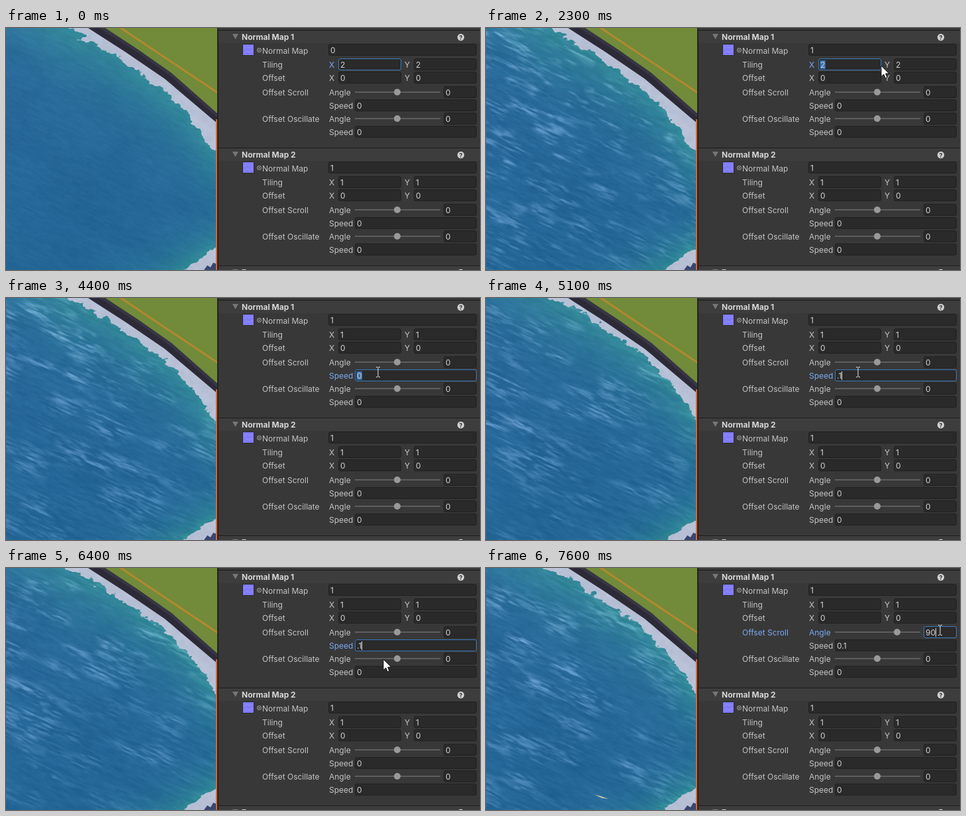
Animation, 716 px wide and 366 px high, one loop 8 s. Source, as an HTML page with a canvas:

```html
<!DOCTYPE html>
<html lang="en">
<head>
<meta charset="utf-8">
<title>Water normal map settings</title>
<style>
html, body { margin: 0; width: 100%; height: 100%; overflow: hidden; background: #383838; }
canvas, svg { position: absolute; left: 0; top: 0; display: block; }
text { font: 12px Inter, Roboto, sans-serif; fill: #c4c4c4; white-space: pre; }
.title { font-weight: 700; fill: #d6d6d6; }
.value { fill: #d2d2d2; }
.on { fill: #7ba9f2; }
.box { fill: #2a2a2a; stroke: #212121; }
.box.hover { stroke: #696969; }
.box.focus { stroke: #3a79bb; }
</style>
</head>
<body>
<canvas id="water" width="319" height="366"></canvas>
<svg id="ui" width="716" height="366" viewBox="0 0 716 366">
  <g id="land">
    <path d="M124 0L180 36L240 77L280 111L319 144V0Z" fill="#2d2a38"/>
    <path d="M141 0L200 38L250 74L319 135V129L250 68L150 0Z" fill="#383545"/>
    <path d="M150 0L200 33L250 68L319 129V0Z" fill="#718b3a"/>
    <path d="M172 -1L320 98" stroke="#b2882f" stroke-width="3"/>
    <path d="M299 366L304 359L309 362L313 355L319 357V366Z" fill="#39466f"/>
  </g>
  <path id="glint" d="M164 343L173 345L178 347L186 349L176 348Z" fill="#ecdca4"/>
  <rect x="319" width="397" height="366" fill="#383838"/>
  <rect x="319" width="2" height="366" fill="#222"/>
  <rect x="317" y="138" width="2" height="228" fill="#e2622c"/>
  <g id="panel"></g>
  <g id="ibeam" fill="none" stroke="#e8e8e8">
    <path d="M-3 -7.5H-1L0 -6.5L1 -7.5H3M0 -6.5V6.5M-3 7.5H-1L0 6.5L1 7.5H3"/>
  </g>
  <g id="arrow">
    <path id="slide" d="M-6 3L-2 0V6ZM10 3L6 0V6Z" fill="#fff" stroke="#111"/>
    <path d="M0 0V16.5L3.8 13L6.3 18.8L9 17.6L6.6 12H11.8Z" fill="#fff" stroke="#111"/>
  </g>
</svg>
<script>
const LOOP = 8000, W = 319, H = 366;
const $ = id => document.getElementById(id);
const clamp = v => v < 0 ? 0 : v > 1 ? 1 : v;

function add(parent, tag, attrs, text) {
  const el = document.createElementNS('http://www.w3.org/2000/svg', tag);
  for (const k in attrs) el.setAttribute(k, attrs[k]);
  if (text !== undefined) el.textContent = text;
  return parent.appendChild(el);
}

// ---- Inspector panel ----
const panel = $('panel');
const parts = {};

function header(y, title) {
  add(panel, 'rect', { x: 321, y: y + 4, width: 395, height: 19, fill: '#3d3d3d' });
  add(panel, 'rect', { x: 321, y: y + 3, width: 395, height: 1, fill: '#1d1d1d' });
  add(panel, 'path', { d: `M342 ${y + 9}H351L346.5 ${y + 17}Z`, fill: '#777' });
  add(panel, 'text', { x: 356, y: y + 18, class: 'title' }, title);
  add(panel, 'circle', { cx: 687, cy: y + 14, r: 5.2, fill: '#d0d0d0' });
  add(panel, 'text', { x: 687, y: y + 17.5, 'text-anchor': 'middle',
    style: 'font-size:9px;font-weight:700;fill:#333' }, '?');
}

const label = (x, y, text) => add(panel, 'text', { x, y: y + 4.5 }, text);

function field(x, right, y, labels) {
  const g = add(panel, 'g', {});
  const box = add(g, 'rect', { x: x + .5, y: y - 9, width: right - x - 1, height: 17, rx: 2.5, class: 'box' });
  const mark = add(g, 'rect', { x: x + 2.5, y: y - 6.5, height: 13, fill: '#3b6fae' });
  const text = add(g, 'text', { x: x + 3, y: y + 4.5, class: 'value' });
  const caret = add(g, 'rect', { y: y - 6.5, width: 1, height: 13, fill: '#ddd' });
  return { x, box, mark, text, caret, labels };
}

function slider(y) {
  add(panel, 'rect', { x: 527, y: y - 1.5, width: 129, height: 2, fill: '#5e5e5e' });
  return add(panel, 'circle', { cx: 591, cy: y - .5, r: 5, fill: '#999' });
}

function section(y, n) {
  header(y, 'Normal Map ' + n);
  add(panel, 'rect', { x: 357.5, y: y + 24.5, width: 17, height: 17, fill: '#7f7cf6', stroke: '#2a2a2a' });
  add(panel, 'path', { d: `M359 ${y + 31}l5 -3l4 2l5 -2M360 ${y + 38}l4 -3l5 2l4 -4`,
    fill: 'none', stroke: '#9a8cff', 'stroke-width': 1.5, opacity: .7 });
  add(panel, 'circle', { cx: 382.5, cy: y + 33.5, r: 3, fill: 'none', stroke: '#b4b4b4' });
  add(panel, 'circle', { cx: 382.5, cy: y + 33.5, r: 1, fill: '#b4b4b4' });

  const f = parts[n] = {};
  f.map = field(487, 711, y + 33.5, [label(387, y + 34.5, 'Normal Map')]);
  [['Tiling', 't', 55.5], ['Offset', 'o', 75.5]].forEach(([name, key, dy]) => {
    label(387, y + dy, name);
    f[key + 'x'] = field(502, 597, y + dy, [label(488, y + dy, 'X')]);
    f[key + 'y'] = field(616, 711, y + dy, [label(602, y + dy, 'Y')]);
  });
  [['Offset Scroll', 's', 97.5], ['Offset Oscillate', 'c', 137.5]].forEach(([name, key, dy]) => {
    const main = label(387, y + dy, name);
    f[key + 'Angle'] = field(661, 711, y + dy, [main, label(488, y + dy, 'Angle')]);
    f[key + 'Angle'].knob = slider(y + dy);
    f[key + 'Speed'] = field(527, 711, y + dy + 20, [label(488, y + dy + 20, 'Speed')]);
  });
}

function setField(f, value, focus, mode, hover) {
  f.text.textContent = value;
  f.box.setAttribute('class', 'box' + (focus ? ' focus' : hover ? ' hover' : ''));
  f.labels.forEach(l => l.setAttribute('class', focus ? 'on' : ''));
  const len = focus ? f.text.getComputedTextLength() : 0;
  f.mark.setAttribute('width', focus && mode === 'all' ? len + 1 : 0);
  f.caret.setAttribute('x', Math.round(f.x + 3 + len));
  f.caret.setAttribute('visibility', focus && mode === 'caret' ? 'visible' : 'hidden');
  if (f.knob) f.knob.setAttribute('cx', 591 + value / 3);
}

section(0, 1);
section(178, 2);
header(356, 'Foam');

// ---- Script of user input ----
const start = { map: '0', tx: '2', ty: '2', ox: '0', oy: '0',
  sAngle: '0', sSpeed: '0', cAngle: '0', cSpeed: '0', focus: 'tx', mode: '', hover: '' };
const input = [
  [600, { focus: 'map', mode: 'all' }],
  [1500, { map: '1', mode: 'caret' }],
  [2200, { focus: 'tx', mode: 'all' }],
  [2500, { tx: '1', mode: 'caret' }],
  [2900, { focus: 'ty', mode: 'all' }],
  [3100, { hover: 'oy' }],
  [3300, { ty: '1', mode: 'caret' }],
  [3500, { hover: '' }],
  [4000, { focus: 'sSpeed', mode: 'all' }],
  [4900, { sSpeed: '.', mode: 'caret' }],
  [5000, { sSpeed: '.1' }],
  [6700, { sSpeed: '0.1', focus: 'sAngle', mode: 'all' }],
  [7400, { sAngle: '9', mode: 'caret' }],
  [7500, { sAngle: '90' }]
];
const stateAt = t => Object.assign({}, start, ...input.filter(e => e[0] <= t).map(e => e[1]));

// time, x, y, pointer shape
const path = [
  [200, 690, 300, 'arrow'], [500, 590, 60, 'arrow'], [600, 567, 33, 'ibeam'],
  [1500, 567, 33, 'ibeam'], [1800, 578, 54, 'ibeam'], [2000, 575, 55, 'ibeam'],
  [2300, 597, 57, 'arrow'], [2500, 597, 57, 'arrow'], [2800, 645, 57, 'ibeam'],
  [3100, 657, 76, 'ibeam'], [3400, 657, 76, 'ibeam'], [3700, 562, 112, 'ibeam'],
  [5500, 562, 112, 'ibeam'], [5800, 620, 138, 'arrow'], [6100, 530, 158, 'slide'],
  [6300, 530, 158, 'slide'], [6400, 570, 138, 'arrow'], [6600, 686, 94, 'ibeam'],
  [LOOP, 686, 94, 'ibeam']
];

function drawPointer(t) {
  const i = path.findIndex((p, k) => k < path.length - 1 && t >= p[0] && t < path[k + 1][0]);
  let shape = '';
  if (i >= 0) {
    const [a, b] = [path[i], path[i + 1]];
    const k = (t - a[0]) / (b[0] - a[0]);
    const place = `translate(${a[1] + (b[1] - a[1]) * k},${a[2] + (b[2] - a[2]) * k})`;
    shape = a[3];
    $('ibeam').setAttribute('transform', place);
    $('arrow').setAttribute('transform', place);
  }
  const show = (id, on) => $(id).setAttribute('display', on ? 'inline' : 'none');
  show('ibeam', shape === 'ibeam');
  show('arrow', shape === 'arrow' || shape === 'slide');
  show('slide', shape === 'slide');
}

// ---- Water ----
const ctx = $('water').getContext('2d');
const image = ctx.createImageData(W, H);
const N = 128, grid = new Float32Array(N * N);
let seed = 7;
for (let i = 0; i < grid.length; i++) {
  seed = (seed * 1664525 + 1013904223) >>> 0;
  grid[i] = seed / 4294967296;
}

function noise(x, y) {
  const xi = Math.floor(x), yi = Math.floor(y);
  let fx = x - xi, fy = y - yi;
  fx *= fx * (3 - 2 * fx);
  fy *= fy * (3 - 2 * fy);
  const x0 = xi & 127, x1 = (xi + 1) & 127, r0 = (yi & 127) * N, r1 = ((yi + 1) & 127) * N;
  const a = grid[r0 + x0], b = grid[r1 + x0];
  const top = a + (grid[r0 + x1] - a) * fx;
  return top + (b + (grid[r1 + x1] - b) * fx - top) * fy;
}

const shore = [[0, -62], [84, 0], [125, 20], [160, 42], [200, 68], [240, 98], [270, 128], [300, 168], [320, 192]];
const shoreY = Float32Array.from({ length: W }, (_, x) => {
  const i = shore.findIndex(p => p[0] > x);
  const [a, b] = [shore[i - 1], shore[i]];
  return a[1] + (b[1] - a[1]) * (x - a[0]) / (b[0] - a[0]);
});

function drawWater(t, s) {
  const power = +s.map, tx = +s.tx, ty = +s.ty;
  const sec = t / 1000, swell = 4 * Math.cos(Math.PI * sec) - 5;
  const speed = t >= 5000 ? 0.1 : 0, turn = s.sAngle * Math.PI / 180;
  const du = speed * sec * 6 * Math.cos(turn), dv = speed * sec * 14 * Math.sin(turn);
  const ca = Math.cos(.44), sa = Math.sin(.44), px = image.data;

  for (let y = 0, o = 0; y < H; y++) {
    const far = 1 - y / H;
    for (let x = 0; x < W; x++, o += 4) {
      const u = x * ca + y * sa, v = y * ca - x * sa;

      // signed distance to the two stretches of foam
      let near = (y - shoreY[x] - swell) * .75;
      let corner = (366 - (x - 265) * .69 - y + swell * -.6) * .8;
      if (near < 18 || corner < 14) {
        const rough = (noise(x / 13 + sec * .3, y / 9) - .5) * 10 + (noise(x / 4, y / 3 + sec * .4) - .5) * 5;
        near -= rough;
        corner -= rough * .6;
      }
      const foam = clamp(.5 - Math.min(near, corner));
      const depth = Math.max(0, Math.min(near, corner * 1.7));
      const teal = Math.exp(-depth / 42);

      const fine = noise(u / 14, v / 3) * .6 + noise(u / 5 + 40, v / 1.8) * .4 - .5;
      let shade = fine * 10 + (noise(u / 60 + 9, v / 30) - .5) * 6, light = 0;
      if (power) {
        // broad patches of glitter, made up of thin ripples
        const m = noise(u / 46 * ty + du, v / 17 * tx + dv);
        const r = noise(u / 20 + du * 2.3, v / 3 + dv * 5.7) * .65 + noise(u / 8 + 31, v / 1.9 + dv * 9) * .35;
        light = clamp((m - .4) / .5) * clamp((r - .38) / .45) * (.4 + .6 * far) * (1 - teal * .5);
        shade += (r - .5) * 12;
      }
      const r = 36 + far * 5 + teal * 12 + shade * .8 + light * 82;
      const g = 103 + teal * 36 + shade + light * 68;
      const b = 151 + far * 5 - teal * 2 + shade + light * 66;
      const grain = (noise(x / 7, y / 7) - .5) * 8;
      px[o] = r + (184 + grain - r) * foam;
      px[o + 1] = g + (192 + grain - g) * foam;
      px[o + 2] = b + (213 + grain - b) * foam;
      px[o + 3] = 255;
    }
  }
  ctx.putImageData(image, 0, 0);
}

// ---- Playback: the picture only refreshes inside these spans ----
const spans = [[0, 0], [200, 700], [1100, 1100], [1500, 1800], [2000, 2300], [2500, 3700],
  [3900, 4100], [4400, 4400], [4900, 5100], [5500, 6800], [7000, 7000], [7400, 7600]];

function heldTime(t) {
  const span = spans.filter(s => s[0] <= t).pop();
  return Math.min(Math.floor(t / 100) * 100, span[1]);
}

let shown = -1;
function render(t) {
  const q = heldTime(t);
  if (q === shown) return;
  shown = q;
  const s = stateAt(q);
  for (const key in parts[1]) {
    setField(parts[1][key], s[key], s.focus === key, s.mode, s.hover === key);
  }
  $('glint').setAttribute('display', q >= 7500 ? 'inline' : 'none');
  drawPointer(q);
  drawWater(q, s);
}

const still = { map: '1', tx: '1', ty: '1' };
for (const key in parts[2]) setField(parts[2][key], still[key] || '0', false, '', false);

const begin = performance.now();
function tick() {
  render((performance.now() - begin) % LOOP);
  requestAnimationFrame(tick);
}
tick();
</script>
</body>
</html>
```
